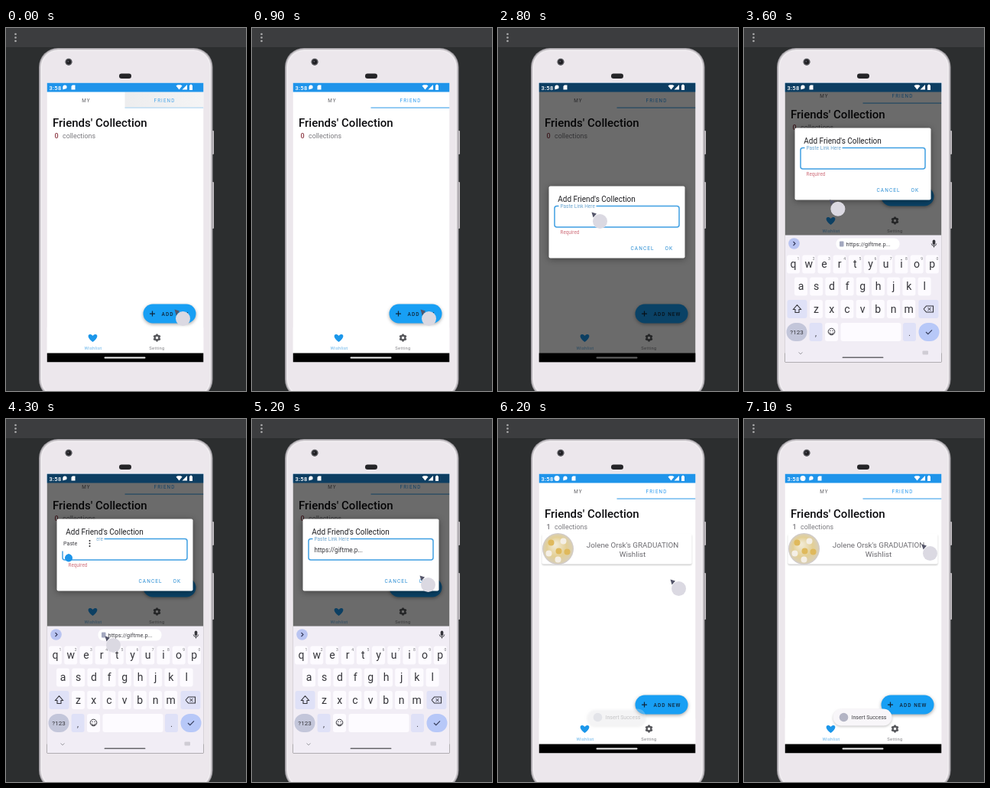
An HTML page with a canvas for the animation above (7.2 s loop, 314 px wide and 474 px high).

```html
<!DOCTYPE html>
<html lang="en">
<head>
<meta charset="utf-8">
<title>Friends' Collection</title>
<style>
html, body { margin: 0; width: 100%; height: 100%; overflow: hidden; background: #2c2e2f; }
canvas { display: block; width: 314px; height: 474px; }
</style>
</head>
<body>
<canvas id="stage"></canvas>
<script>
const W = 314, H = 474, LOOP = 7200, STEP = 100;
const BLUE = '#2d9bf0', GREY = '#7b7a7f';
const SCREEN = [54, 72, 205, 365];
const canvas = document.getElementById('stage');
const ctx = canvas.getContext('2d');
const dpr = window.devicePixelRatio || 1;
canvas.width = W * dpr;
canvas.height = H * dpr;

const lerp = (a, b, k) => a + (b - a) * k;
const ramp = (t, a, b) => {
  const k = Math.min(1, Math.max(0, (t - a) / (b - a)));
  return k * k * (3 - 2 * k);
};

// time, x, y
const cursorPath = [
  [0, 232, 380], [1300, 232, 380], [1700, 137, 258], [2200, 137, 258],
  [2500, 134, 253], [3500, 134, 253], [3800, 93, 190], [3900, 93, 190],
  [4200, 141, 296], [4500, 141, 296], [5000, 231, 217], [5300, 231, 217],
  [5600, 237, 222], [6200, 237, 222], [6800, 244, 176], [7200, 244, 176]
];

function cursorAt(t) {
  const i = cursorPath.findIndex(p => p[0] > t);
  const [a, b] = [cursorPath[i - 1], cursorPath[i]];
  const k = ramp(t, a[0], b[0]);
  return [lerp(a[1], b[1], k), lerp(a[2], b[2], k)];
}

function rect(x, y, w, h, color, r = 0) {
  ctx.fillStyle = color;
  ctx.beginPath();
  ctx.roundRect(x, y, w, h, r);
  ctx.fill();
}

function circle(x, y, r, color) {
  ctx.fillStyle = color;
  ctx.beginPath();
  ctx.arc(x, y, r, 0, Math.PI * 2);
  ctx.fill();
}

function poly(points, color, width) {
  ctx.beginPath();
  points.forEach(([x, y]) => ctx.lineTo(x, y));
  if (width) {
    ctx.strokeStyle = color;
    ctx.lineWidth = width;
    ctx.stroke();
  } else {
    ctx.fillStyle = color;
    ctx.fill();
  }
}

function text(str, x, y, size, color, { weight = 400, align = 'left', gap = 0 } = {}) {
  ctx.font = `${weight} ${size}px Roboto, sans-serif`;
  ctx.letterSpacing = gap + 'px';
  ctx.textAlign = align;
  ctx.fillStyle = color;
  ctx.fillText(str, x, y);
}

function label(str, x, y, size, color) {
  text(str, x, y, size, color, { align: 'center', gap: 1.1 });
}

function shifted(dy, draw) {
  ctx.save();
  ctx.translate(0, dy);
  draw();
  ctx.restore();
}

function faded(alpha, draw) {
  if (alpha <= 0) return;
  ctx.save();
  ctx.globalAlpha = alpha;
  draw();
  ctx.restore();
}

function withShadow(blur, alpha, draw) {
  ctx.save();
  ctx.shadowColor = `rgba(0,0,0,${alpha})`;
  ctx.shadowBlur = blur * dpr;
  ctx.shadowOffsetY = 1.5 * dpr;
  draw();
  ctx.restore();
}

function drawPhone() {
  rect(0, 0, W, H, '#2c2e2f');
  rect(0, 0, W, 25, '#3c3d3f');
  [8, 12.5, 17].forEach(y => circle(12.5, y, 1.3, '#adadae'));
  rect(268, 134, 4, 31, '#cbc6cb', 1);
  rect(268, 201, 4, 61, '#cbc6cb', 1);
  // bevel, outermost ring first
  ['#98959a', '#c0bcc1', '#dcd8dc', '#f5f2f5', '#ece7ec'].forEach((color, i) =>
    rect(43 + i, 26 + i, 227.5 - 2 * i, 458 - 2 * i, color, 25 - i));
  circle(82, 44.3, 4.6, '#55555a');
  circle(82, 44.3, 3, '#1d1d20');
  circle(81.3, 43.7, 1, '#5b5c66');
  rect(148, 59.5, 16, 6.5, '#252528', 3.2);
}

function drawStatusIcons(t) {
  text('3:58', 57, 81, 7.5, '#fff', { weight: 500, gap: 0.3 });
  const late = t >= 5300;
  if (late) circle(77.5, 78, 3.5, '#fff');
  const x = late ? 88.5 : 77.5;
  circle(x, 77.5, 2.6, '#fff');
  poly([[x - 2.6, 77.5], [x - 2.6, 81], [x, 80]], '#fff');
  const card = late ? 97 : 86;
  poly([[card + 1.5, 75], [card + 5, 75], [card + 5, 81], [card, 81], [card, 76.5]], '#fff');
  poly([[223, 76], [225, 74.7], [229, 74.7], [231, 76], [227, 81]], '#fff');
  poly([[231, 81], [237.5, 81], [237.5, 74.5]], '#fff');
  rect(240.5, 75, 4, 6.5, '#fff', 0.6);
  rect(241.5, 74.2, 2, 1.2, '#fff');
}

function drawTabs(t) {
  const press = 1 - ramp(t, 500, 900);
  faded(press, () => {
    const g = ctx.createLinearGradient(156, 0, 259, 0);
    g.addColorStop(0, '#ededee');
    g.addColorStop(1, '#f4f4f5');
    rect(156, 84, 103, 21, g);
  });
  label('MY', 105.5, 97.3, 6.3, '#57575c');
  label('FRIEND', 208, 97.3, 6.3, press > 0.5 ? '#4aa6e8' : BLUE);
  rect(156, 104, 103, 1.2, press > 0.5 ? '#b4d9f3' : '#55adeb');
}

function drawCard() {
  withShadow(2, 0.2, () => rect(58, 150, 196, 40, '#fff', 2));
  circle(79, 170, 20.5, '#cfcacc');
  const g = ctx.createRadialGradient(75, 164, 2, 79, 170, 20);
  g.addColorStop(0, '#f1e9d2');
  g.addColorStop(0.6, '#e3cf95');
  g.addColorStop(1, '#d8cfb9');
  circle(79, 170, 19.5, g);
  [[70, 162], [86, 160], [80, 173], [67, 176], [91, 174], [79, 184]].forEach(([x, y], i) =>
    circle(x, y, 4, i % 2 ? '#f4efe6' : '#dfb95c'));
  text("Jolene Orsk's GRADUATION", 176.5, 168, 9.8, '#6b6a6f', { align: 'center' });
  text('Wishlist', 176.5, 180, 9.8, '#6b6a6f', { align: 'center' });
}

function drawGear(x, y, color) {
  ctx.save();
  ctx.translate(x, y);
  for (let i = 0; i < 6; i++) {
    ctx.rotate(Math.PI / 3);
    rect(-1.3, -5, 2.6, 3, color, 0.4);
  }
  ctx.strokeStyle = color;
  ctx.lineWidth = 2.2;
  ctx.beginPath();
  ctx.arc(0, 0, 2.8, 0, Math.PI * 2);
  ctx.stroke();
  ctx.restore();
}

function drawHeart(x, y, color) {
  ctx.fillStyle = color;
  ctx.beginPath();
  ctx.moveTo(x, y + 5);
  ctx.bezierCurveTo(x - 11, y - 3, x - 4, y - 8, x, y - 3);
  ctx.bezierCurveTo(x + 4, y - 8, x + 11, y - 3, x, y + 5);
  ctx.fill();
}

function drawBottom() {
  withShadow(4, 0.35, () => rect(180, 361, 69, 25, '#189ff4', 12.5));
  rect(188.5, 373, 7, 1.2, '#10263a');
  rect(191.4, 370.1, 1.2, 7, '#10263a');
  text('ADD NEW', 204, 376.3, 6.6, '#10263a', { weight: 500, gap: 1 });
  rect(54, 392, 205, 33, '#fff');
  drawHeart(114, 405.5, '#1c97ea');
  drawGear(198, 405, '#57585c');
  text('Wishlist', 114.5, 420, 5.8, '#5fb0e9', { align: 'center', gap: 0.3 });
  text('Setting', 198, 420, 5.8, '#858589', { align: 'center', gap: 0.3 });
}

function drawApp(t, keyboard) {
  const done = t >= 6100;
  const pan = t < 5300 ? keyboard : 0;
  rect(...SCREEN, '#fff');
  shifted(-6 * pan, () => drawTabs(t));
  shifted(-11 * pan, () => {
    text("Friends' Collection", 61.5, 129, 15, '#0c0c0f', { weight: 500 });
    text(done ? '1' : '0', 64, 144, 9, done ? GREY : '#8f3d48', { weight: 500 });
    text('collections', 74.5, 144, 8.9, GREY);
  });
  if (done) drawCard();
  if (t < 5300 || t >= 6000) shifted(-153 * pan, drawBottom);
  rect(54, 72, 205, 12, '#1f94ea');
  rect(54, 425, 205, 12, '#000');
  rect(129, 430, 54, 2, '#f2f2f2', 1);
}

function drawField(t) {
  const focus = ramp(t, 2100, 2400);
  ctx.strokeStyle = focus > 0.3 ? '#3f9fe2' : '#919196';
  ctx.lineWidth = lerp(0.9, 1.5, focus);
  ctx.beginPath();
  ctx.roundRect(74.5, 233, 163, 27.5, 3);
  ctx.stroke();
  if (focus > 0.5) rect(80, 231, 49, 4, '#fff');
  text('Paste Link Here', 82, lerp(249.5, 235.5, focus), lerp(8.2, 6.5, focus),
    focus > 0.5 ? '#6aa5d0' : '#7a7a7f');
  if (t >= 4500) text('https://giftme.p...', 82, 250, 8.2, '#333338');
  else text('Required', 82, 269, 6.3, '#cf6f7b');
}

function drawDialog(t) {
  withShadow(8, 0.4, () => rect(67, 207, 178, 94, '#fff', 2));
  text("Add Friend's Collection", 78.8, 227, 10, '#1e1e22');
  drawField(t);
  text('CANCEL', 174, 290, 6.5, '#2c8fd4', { gap: 1.1 });
  text('OK', 219, 290, 6.5, '#2c8fd4', { gap: 1.1 });
  if (t >= 3900 && t < 4500) {
    rect(69, 229, 50, 20, '#fff', 2);
    text('Paste', 75.5, 241.5, 7.2, '#3b3b40');
    [235.5, 239, 242.5].forEach(y => circle(110, y, 1, '#2b2b2f'));
  }
  if (t >= 3800 && t < 4500) {
    circle(82.5, 258, 5, '#1d95ea');
    poly([[82.5, 252.5], [86.5, 255], [78.5, 255]], '#1d95ea');
  }
}

function key(x, y, w, char, color = '#fdfbff', r = 3) {
  rect(x - w / 2, y - 12, w, 24, color, r);
  if (char) text(char, x, y + 4.8, 14, '#35353a', { align: 'center' });
}

function keyRow(chars, x, y, digits) {
  [...chars].forEach((char, i) => {
    const cx = x + i * 20.2;
    key(cx, y, 17, char);
    if (digits) text((i + 1) % 10, cx + 6.5, y - 6, 5, '#77777c', { align: 'center' });
  });
}

function drawKeyboard(t) {
  const pale = '#dfe1f7', line = '#35353b';
  rect(54, 271, 205, 166, '#f1edf5');
  circle(66, 282, 7.3, '#b9c4f1');
  poly([[65, 279.5], [67.5, 282], [65, 284.5]], '#34385a', 1.1);
  rect(247.2, 277, 3.6, 6.5, line, 1.8);
  poly([[245.7, 282], [247, 284.6], [251, 284.6], [252.3, 282]], line, 0.9);
  rect(248.5, 284.5, 1, 2.5, line);
  if (t >= 3200 && t < 4500) {
    rect(121, 275, 83, 15, '#fff', 7);
    rect(125.5, 279, 5.5, 7, '#a3a8bf', 1);
    text('https://giftme.p...', 134, 285, 7.5, '#3c3c42');
  }
  keyRow('qwertyuiop', 65, 309, true);
  keyRow('asdfghjkl', 75, 338);
  keyRow('zxcvbnm', 95, 367.5);

  key(70, 367.5, 26, '', pale);
  poly([[70, 362], [75, 368], [72.5, 368], [72.5, 372], [67.5, 372], [67.5, 368], [65, 368], [70, 362]], line, 1.1);
  key(242, 367.5, 26, '', pale);
  poly([[235.5, 367.5], [239, 363.5], [248, 363.5], [248, 371.5], [239, 371.5], [235.5, 367.5]], line, 1.1);
  poly([[241, 365.5], [245, 369.5]], line, 1);
  poly([[245, 365.5], [241, 369.5]], line, 1);

  key(69.5, 397.5, 27, '', '#c3c6da', 12);
  text('?123', 69.5, 400.3, 8, line, { align: 'center' });
  key(94.5, 397.5, 17, '', pale);
  key(217, 397.5, 17, '', pale);
  text(',', 94.5, 402, 10, line, { align: 'center' });
  text('.', 217, 402, 10, line, { align: 'center' });
  key(115, 397.5, 17);
  ctx.strokeStyle = line;
  ctx.lineWidth = 1;
  ctx.beginPath();
  ctx.arc(115, 397, 4.3, 0, Math.PI * 2);
  ctx.moveTo(117.4, 398);
  ctx.arc(115, 398, 2.4, 0, Math.PI);
  ctx.stroke();
  circle(113.4, 395.7, 0.7, line);
  circle(116.6, 395.7, 0.7, line);
  key(166.5, 397.5, 79);
  key(242.5, 397.5, 27, '', '#b7c8f8', 12);
  poly([[238.5, 397.5], [241.3, 400.2], [246.5, 394.8]], '#38405e', 1.2);

  poly([[72, 424], [74.5, 426.3], [77, 424]], '#9c9ca2', 1);
  rect(129, 430, 54, 1.6, '#67676b', 0.8);
  rect(234, 422, 7.5, 5, '#cfccd4', 1);
}

function drawToast() {
  withShadow(3, 0.2, () => rect(117, 379, 77, 22, '#f8f6f9', 11));
  circle(131, 390, 5.8, '#b3b4c4');
  text('Insert Success', 141, 392.6, 7, '#414145');
}

function drawCursor(t) {
  const [x, y] = cursorAt(t);
  circle(x, y, 9.5, '#dbd9e2');
  poly([[x - 11, y - 12], [x - 4.5, y - 10], [x - 9, y - 5]], '#55566a');
}

// Lavender cast over the screen between closing the dialog and the refresh
function drawTint() {
  ctx.globalCompositeOperation = 'multiply';
  rect(...SCREEN, '#f0ebf1');
  ctx.globalCompositeOperation = 'source-over';
}

function draw(t) {
  const keyboard = ramp(t, 2900, 3200) * (1 - ramp(t, 5800, 6100));
  const dialog = ramp(t, 1300, 1600) * (1 - ramp(t, 5200, 5400));
  ctx.setTransform(dpr, 0, 0, dpr, 0, 0);
  drawPhone();
  ctx.translate(-0.5, -0.5);
  ctx.save();
  ctx.beginPath();
  ctx.rect(...SCREEN);
  ctx.clip();
  drawApp(t, keyboard);
  faded(dialog, () => {
    rect(...SCREEN, 'rgba(0,0,0,0.58)');
    shifted(-76 * keyboard, () => drawDialog(t));
  });
  if (keyboard > 0) shifted(166 * (1 - keyboard), () => drawKeyboard(t));
  faded(ramp(t, 6100, 6400), drawToast);
  if (t >= 5300 && t < 6000) drawTint();
  drawStatusIcons(t);
  ctx.restore();
  drawCursor(t);
}

const start = performance.now();
function tick() {
  const time = (performance.now() - start) % LOOP;
  draw(Math.floor(time / STEP) * STEP);
  requestAnimationFrame(tick);
}
tick();
</script>
</body>
</html>
```
